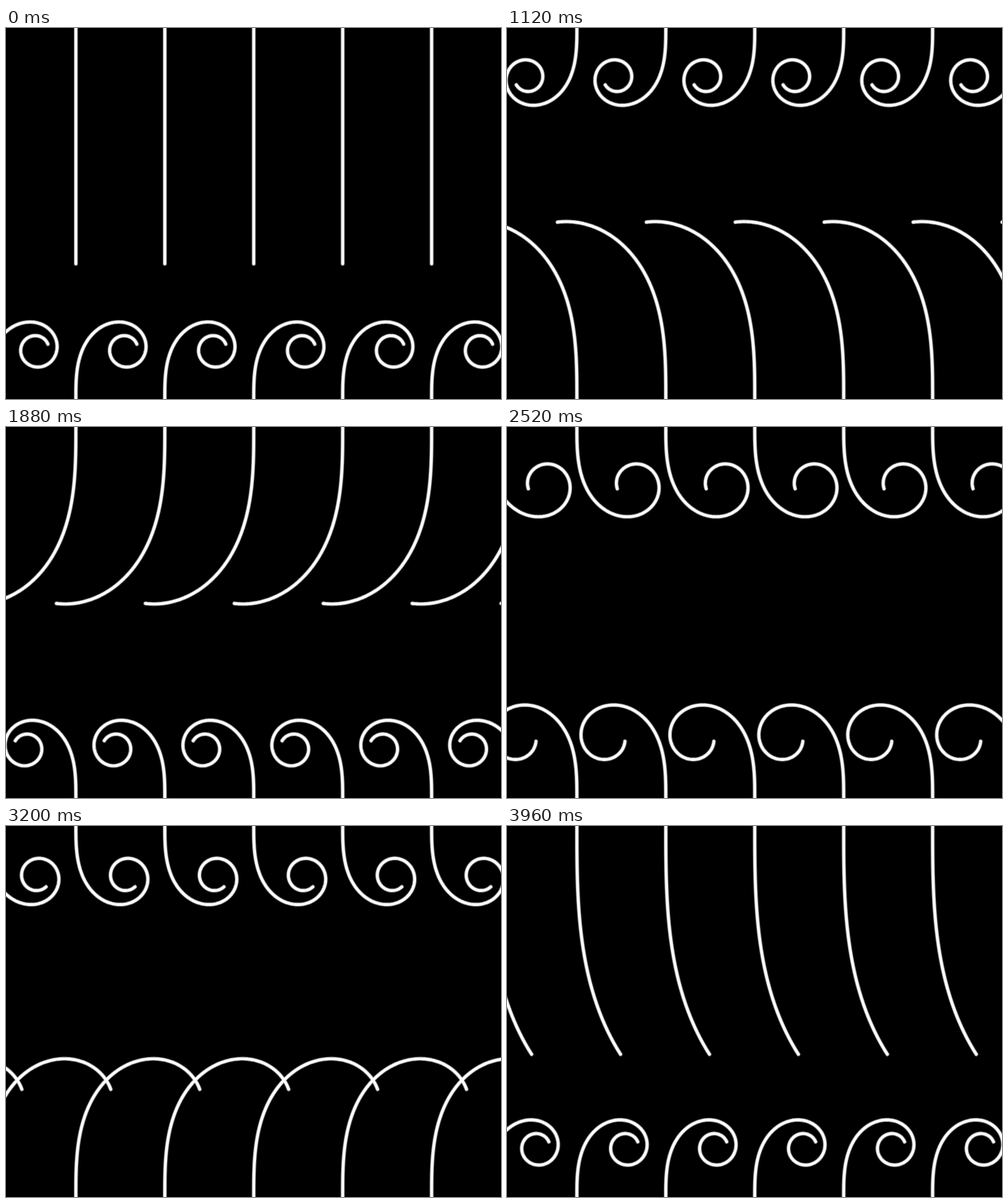
Recreate the animation shown at these times as an HTML page with a canvas. Size 600x450 px, loop 4 s.

```html
<!DOCTYPE html>
<html lang="en">
<head>
<meta charset="utf-8">
<title>Curling lines</title>
<style>
html, body { margin: 0; width: 100%; height: 100%; overflow: hidden; background: #000; }
canvas { display: block; }
</style>
</head>
<body>
<canvas id="stage" width="600" height="450"></canvas>
<script>
const ctx = document.getElementById('stage').getContext('2d');
const LOOP = 4000, STEP = 40;
const LENGTH = 286, SEGMENTS = 160, MAX_TURN = 9.05;
const CENTER = 300.3, GAP = 107.8, SIDE = 4;

// Heading grows with the square of the arc length (a clothoid).
function spiral(turn) {
  const ds = LENGTH / SEGMENTS;
  const points = [[0, -10], [0, 0]];
  let x = 0, y = 0;
  for (let i = 0; i < SEGMENTS; i++) {
    const u = (i + 0.5) / SEGMENTS;
    const heading = turn * u * u;
    x += ds * Math.sin(heading);
    y += ds * Math.cos(heading);
    points.push([x, y]);
  }
  return points;
}

function addRow(path, turn, baseY, dir) {
  const points = spiral(turn);
  for (let k = -SIDE; k <= SIDE; k++) {
    const baseX = CENTER + k * GAP;
    points.forEach(([x, y], i) => {
      path[i ? 'lineTo' : 'moveTo'](baseX + x, baseY + dir * y);
    });
  }
}

function stroke(path, width, color) {
  ctx.lineWidth = width;
  ctx.strokeStyle = color;
  ctx.stroke(path);
}

function draw(time) {
  const phase = 2 * Math.PI * time / LOOP;
  const path = new Path2D();
  addRow(path, -MAX_TURN * Math.sin(phase), 0, 1);
  addRow(path, MAX_TURN * Math.cos(phase), 449.5, -1);

  ctx.fillStyle = '#000';
  ctx.fillRect(0, 0, 600, 450);
  ctx.lineCap = ctx.lineJoin = 'round';
  // A wider dim stroke gives the lines their soft edge.
  stroke(path, 5, 'rgba(255,255,255,0.45)');
  stroke(path, 3.4, '#fff');
}

const start = performance.now();
function tick() {
  const time = (performance.now() - start) % LOOP;
  draw(Math.floor(time / STEP) * STEP);
  requestAnimationFrame(tick);
}
tick();
</script>
</body>
</html>
```
